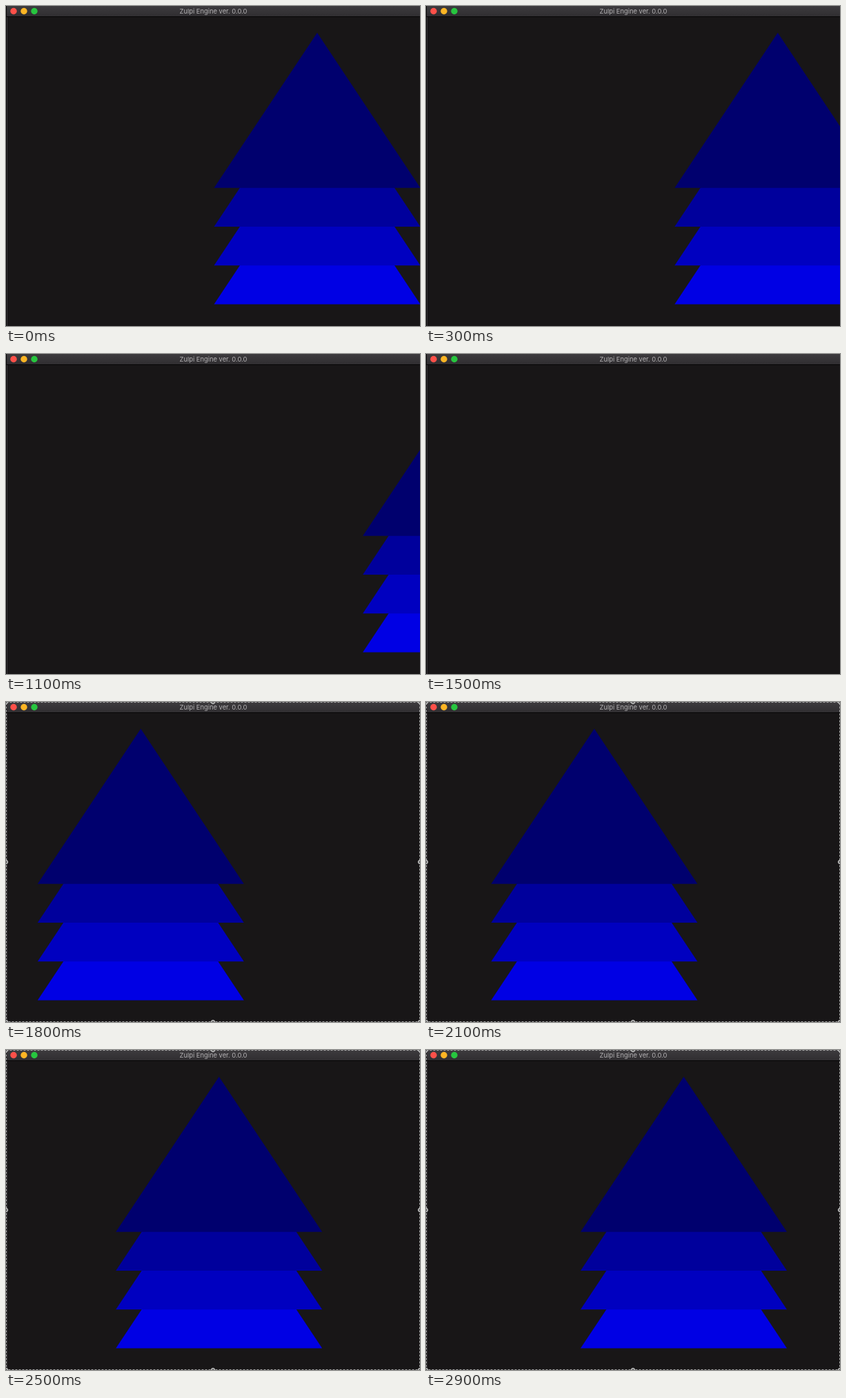
Animation of 600 by 464 pixels, one loop 3000 ms. Source, as an HTML page with a canvas:

```html
<!DOCTYPE html>
<html lang="en">
<head>
<meta charset="utf-8">
<title>Sliding triangles</title>
<style>
  html, body { margin: 0; width: 100%; height: 100%; overflow: hidden; background: #181617; }
  canvas { display: block; }
</style>
</head>
<body>
<canvas width="600" height="464"></canvas>
<script>
const W = 600, H = 464, LOOP = 3000, STEP = 100;
const ctx = document.querySelector('canvas').getContext('2d');
const blues = ['#00006e', '#00009c', '#0000c0', '#0000e4'];

function disc(x, y, r, fill, stroke) {
  ctx.beginPath();
  ctx.arc(x, y, r, 0, 2 * Math.PI);
  ctx.fillStyle = fill;
  ctx.fill();
  if (stroke) {
    ctx.strokeStyle = stroke;
    ctx.stroke();
  }
}

function drawTriangles(x) {
  for (let i = blues.length - 1; i >= 0; i--) {
    const top = 38.8 + i * 56.25;
    ctx.fillStyle = blues[i];
    ctx.beginPath();
    ctx.moveTo(x, top);
    ctx.lineTo(x + 149.5, top + 225);
    ctx.lineTo(x - 149.5, top + 225);
    ctx.fill();
  }
}

function drawWindow() {
  ctx.fillStyle = '#181617';
  ctx.fillRect(0, 0, W, H);
  const bar = ctx.createLinearGradient(0, 0, 0, 15);
  bar.addColorStop(0, '#3d3b3e');
  bar.addColorStop(1, '#302e31');
  ctx.fillStyle = bar;
  ctx.fillRect(0, 0, W, 15);
  ctx.fillStyle = '#050505';
  ctx.fillRect(0, 15, W, 1);
  ctx.fillRect(0, 0, 1, H);
  ctx.fillStyle = '#3a383a';
  ctx.fillRect(1, 16, 1, H);
  ['#ff5049', '#fdb524', '#27c53f'].forEach((c, i) => disc(11 + 15 * i, 7.5, 4.7, c));
  ctx.fillStyle = '#b5b3b5';
  ctx.font = '9.35px Inter, sans-serif';
  ctx.textAlign = 'center';
  ctx.fillText('Zulpi Engine ver. 0.0.0', 300.5, 11);
}

function drawSelection() {
  ctx.lineWidth = 1;
  ctx.strokeStyle = '#a5a5a5';
  ctx.setLineDash([3, 2]);
  ctx.strokeRect(0.5, 0.5, W - 1, H - 1);
  ctx.setLineDash([]);
  for (const x of [0, W / 2, W])
    for (const y of [0, H / 2, H])
      if (x !== W / 2 || y !== H / 2) disc(x, y, 2.7, '#777', '#d0d0d0');
}

function draw(now) {
  const t = Math.floor((now % LOOP) / STEP) * STEP;
  const selected = t >= 1600;
  drawWindow();
  if (selected) drawTriangles(195.3 + (t - 1800) * 0.162);
  else if (t < 1500) drawTriangles(451 + t * 0.196);
  if (selected) drawSelection();
}

const start = performance.now();
function tick() {
  draw(performance.now() - start);
  requestAnimationFrame(tick);
}
tick();
</script>
</body>
</html>
```
